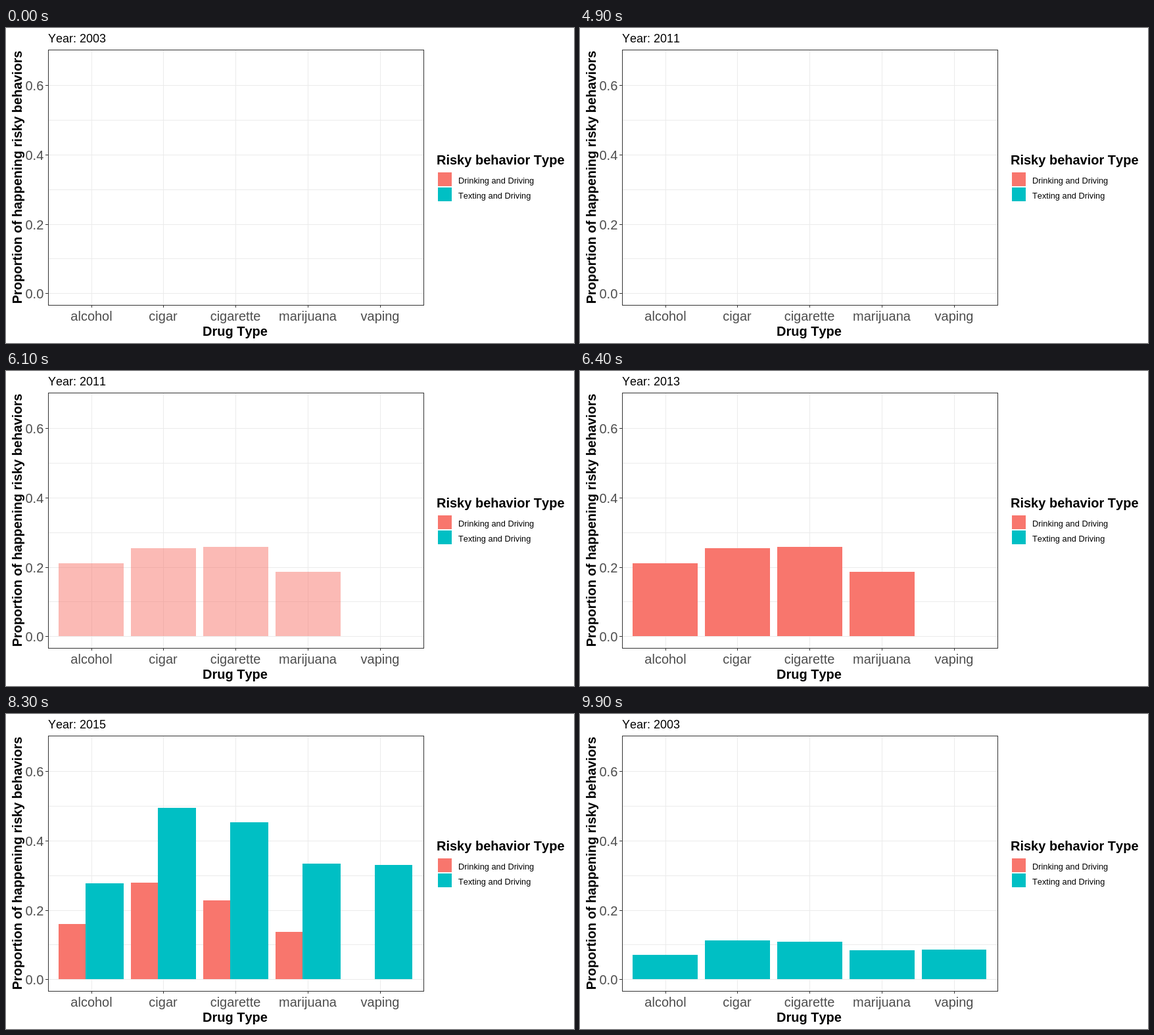
An HTML page with a canvas that plays this animation: 864 px wide and 480 px high, repeating every 10 s.

```html
<!DOCTYPE html>
<html lang="en">
<head>
<meta charset="utf-8">
<title>Risky behaviors by drug type</title>
<style>
html, body { margin: 0; width: 100%; height: 100%; overflow: hidden; background: #fff; }
canvas { display: block; }
</style>
</head>
<body>
<canvas id="chart" width="864" height="480"></canvas>
<script>
const ctx = document.getElementById('chart').getContext('2d');
const RED = '#F8766D', TEAL = '#00BFC4', DARK = '#333333', GRID = '#EBEBEB', LABEL = '#4D4D4D';
const LOOP = 10000, STEP = 100, BASE = 404;
const PANEL = { left: 64, top: 33, right: 635, bottom: 422 };
const DRUGS = ['alcohol', 'cigar', 'cigarette', 'marijuana', 'vaping'];

// Steps at which the year label advances; each transition runs six steps around one.
const YEAR_STEPS = [10, 23, 36, 49, 62, 74, 86, 98];

// Bar heights in pixels, one per drug
const RED_2013 = [111, 134, 136, 98, 0];
const RED_2015 = [101, 176, 144, 86, 0];
const TEAL_2015 = [131, 242, 218, 159, 155];
const TEAL_2017 = [223, 354, 342, 262, 270];

const lerp = (a, b, p) => a + (b - a) * p;
const xAt = category => Math.round(129.65 + 109.82 * category);
const yAt = tenths => Math.round(404.1 - 52.77 * tenths);

function rect(x, y, w, h, color) {
  ctx.fillStyle = color;
  ctx.fillRect(x, y, w, h);
}

function text(string, x, y, size, { color = '#000', align = 'left', bold = false } = {}) {
  ctx.font = `${bold ? 'bold ' : ''}${size}px "Liberation Sans", Arial, sans-serif`;
  ctx.fontKerning = 'none';
  ctx.textAlign = align;
  ctx.fillStyle = color;
  ctx.fillText(string, x, y);
}

function bars(color, alpha, from, to, heightAt) {
  ctx.globalAlpha = alpha;
  DRUGS.forEach((_, i) => {
    const left = xAt(i + from), top = Math.round(BASE - heightAt(i));
    rect(left, top, xAt(i + to) - left, BASE - top, color);
  });
  ctx.globalAlpha = 1;
}

function drawGrid() {
  const { left, top, right, bottom } = PANEL;
  for (let tenths = 0; tenths <= 6; tenths++) rect(left, yAt(tenths), right - left, 1, GRID);
  DRUGS.forEach((_, i) => rect(xAt(i), top, 1, bottom - top, GRID));
}

function drawAxes() {
  const { left, top, right, bottom } = PANEL;
  ctx.strokeStyle = DARK;
  ctx.lineWidth = 1;
  ctx.strokeRect(left + 0.5, top + 0.5, right - left, bottom - top);
  for (let tenths = 0; tenths <= 6; tenths += 2) {
    const y = yAt(tenths);
    rect(left - 4, y, 4, 1, DARK);
    text((tenths / 10).toFixed(1), 57.3, y + 8, 20, { color: LABEL, align: 'right' });
  }
  DRUGS.forEach((drug, i) => {
    rect(xAt(i), bottom + 1, 1, 3, DARK);
    text(drug, xAt(i), 446, 20, { color: LABEL, align: 'center' });
  });
  text('Drug Type', 348.5, 469, 20, { align: 'center', bold: true });
  ctx.save();
  ctx.translate(24, 227.5);
  ctx.rotate(-Math.PI / 2);
  text('Proportion of happening risky behaviors', 0, 0, 20, { align: 'center', bold: true });
  ctx.restore();
}

function drawLegend() {
  text('Risky behavior Type', 655, 208, 20, { bold: true });
  rect(657, 220, 21, 21, RED);
  rect(657, 243, 21, 21, TEAL);
  text('Drinking and Driving', 688, 237, 12.8);
  text('Texting and Driving', 688, 260, 12.8);
}

function draw(time) {
  const step = Math.floor((time % LOOP) / STEP);
  const progress = YEAR_STEPS.map(s => Math.min(1, Math.max(0, (step - s + 4) / 6)));
  const [to2013, to2015, to2017, to2003] = progress.slice(4);
  const year = 2003 + 2 * (YEAR_STEPS.filter(s => s <= step).length % 8);

  rect(0, 0, 864, 480, '#fff');
  drawGrid();
  bars(RED, to2013, -0.45, lerp(0.45, 0, to2015),
    i => lerp(RED_2013[i], RED_2015[i], to2015) * (1 - to2017));
  bars(TEAL, to2015, lerp(0, -0.45, to2017), 0.45,
    i => lerp(TEAL_2015[i], TEAL_2017[i], to2017) * (1 - to2003));
  drawAxes();
  drawLegend();
  text(`Year: ${year}`, 64, 22, 18);
}

const start = performance.now();
function tick() {
  draw(performance.now() - start);
  requestAnimationFrame(tick);
}
tick();
</script>
</body>
</html>
```
